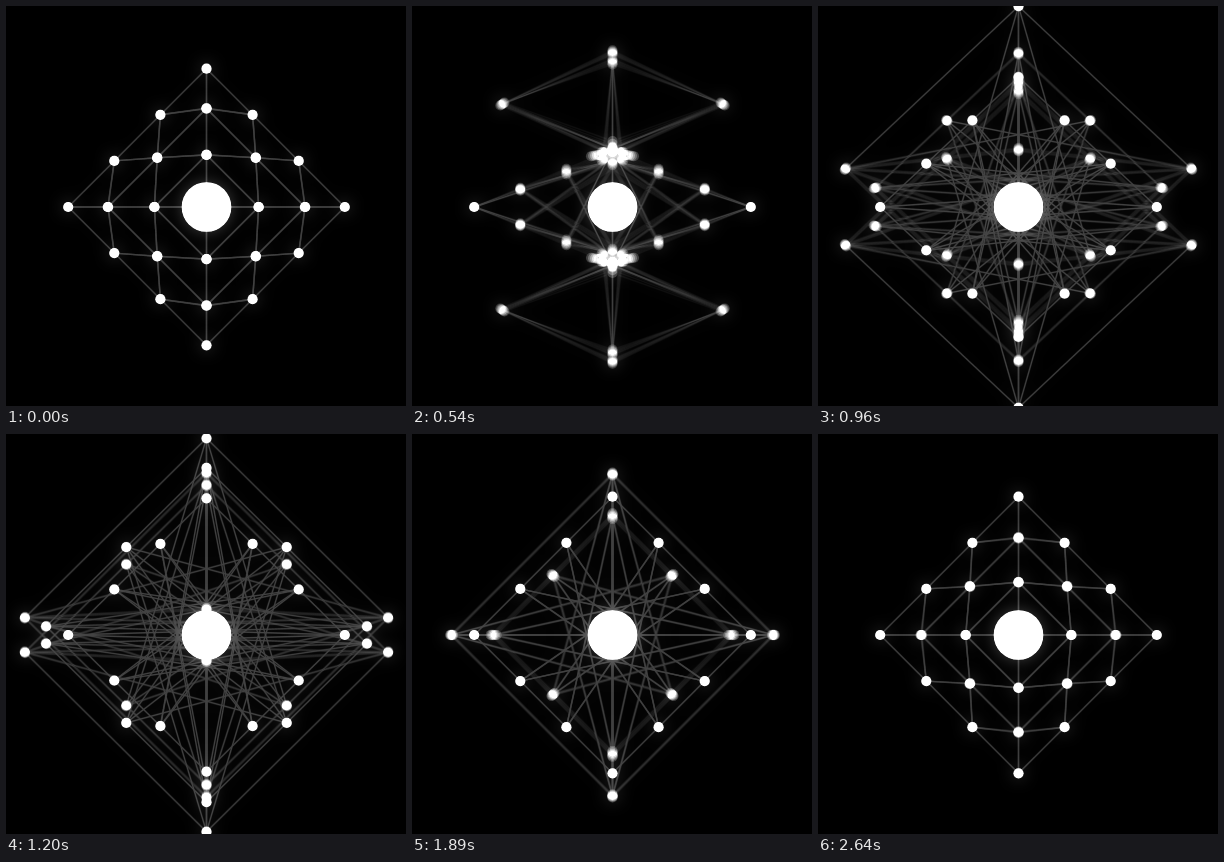
Animation of 400x400 px, one loop 2.67 s. Source, as an HTML page with a canvas:

```html
<!DOCTYPE html>
<html lang="en">
<head>
<meta charset="utf-8">
<title>Turning octahedron lattice</title>
<style>
  html, body { margin: 0; width: 100%; height: 100%; overflow: hidden; background: #000; }
  canvas { display: block; width: 400px; height: 400px; }
</style>
</head>
<body>
<canvas id="stage" width="400" height="400"></canvas>
<script>
const LOOP = 2670, STEP = 30, SAMPLES = 5;
const SIZE = 400, CX = 200.5, CY = 201;
const UNIT = 46.1, DEPTH = 55.8, DOT = 5.1, HUB = 24.8;

const ctx = document.getElementById('stage').getContext('2d');
const layer = document.createElement('canvas');
layer.width = layer.height = SIZE;
const pen = layer.getContext('2d');

// Monotone cubic curve through [x, y] points, flat at both ends.
function curve(pts) {
  const sec = pts.slice(1).map((p, i) => (p[1] - pts[i][1]) / (p[0] - pts[i][0]));
  const slope = pts.map((_, i) => {
    const a = sec[i - 1], b = sec[i];
    return a > 0 && b > 0 ? 2 * a * b / (a + b) : 0;
  });
  return x => {
    let i = 0;
    while (i < pts.length - 2 && x > pts[i + 1][0]) i++;
    const [x0, y0] = pts[i], [x1, y1] = pts[i + 1];
    const h = x1 - x0, s = (x - x0) / h, r = 1 - s;
    return y0 * r * r * (1 + 2 * s) + y1 * s * s * (3 - 2 * s)
      + h * s * r * (slope[i] * r - slope[i + 1] * s);
  };
}

const turn = curve([[0, 0], [.1, .29], [.1966, .626], [.354, .889], [.545, .987], [.72, 1], [1, 1]]);
const fold = curve([[0, 0], [.2, .028], [.292, .076], [.404, .168], [.607, .557], [.8, .84], [.9, .96], [1, 1]]);

// Lattice points on the surface |x| + |y| + |z| = 3.
const nodes = [];
for (let x = -3; x <= 3; x++)
  for (let y = -3; y <= 3; y++)
    for (let z = -3; z <= 3; z++)
      if (Math.abs(x) + Math.abs(y) + Math.abs(z) === 3) nodes.push([x, y, z]);

const edges = [];
nodes.forEach((a, i) => nodes.slice(0, i).forEach((b, j) => {
  const d = a.map((v, k) => Math.abs(v - b[k]));
  if (Math.max(...d) === 1 && d[0] + d[1] + d[2] === 2) edges.push([i, j]);
}));

function project(time) {
  const angle = Math.PI * turn(time / LOOP);
  const cos = Math.cos(angle), sin = Math.sin(angle);
  const near = 183 - 131 * fold(Math.abs(2 * time / LOOP - 1));
  const scale = [UNIT, 101.4 - near, near, 0];
  return nodes.map(([x, y, z]) => {
    const s = scale[Math.abs(z)];
    return [CX + x * s, CY + y * s * cos - z * DEPTH * sin];
  });
}

function disc(x, y, r) {
  pen.beginPath();
  pen.arc(x, y, r, 0, 2 * Math.PI);
  pen.fill();
}

function drawPose(time) {
  const pos = project(time);
  pen.globalCompositeOperation = 'source-over';
  pen.fillStyle = '#000';
  pen.fillRect(0, 0, SIZE, SIZE);
  // Crossing or coinciding lines do not brighten each other.
  pen.globalCompositeOperation = 'lighten';
  pen.strokeStyle = '#383838';
  pen.lineWidth = 1.4;
  for (const [a, b] of edges) {
    pen.beginPath();
    pen.moveTo(...pos[a]);
    pen.lineTo(...pos[b]);
    pen.stroke();
  }
  pen.fillStyle = '#fff';
  for (const [x, y] of pos) disc(x, y, DOT);
  disc(CX, CY, HUB);
}

// Averages several poses across one step for motion blur.
function render(time) {
  ctx.globalCompositeOperation = 'source-over';
  ctx.globalAlpha = 1;
  ctx.fillStyle = '#000';
  ctx.fillRect(0, 0, SIZE, SIZE);
  ctx.globalCompositeOperation = 'lighter';
  ctx.globalAlpha = 1 / SAMPLES;
  for (let i = 0; i < SAMPLES; i++) {
    const back = STEP * (1 - (i + .5) / SAMPLES);
    drawPose((time - back + LOOP) % LOOP);
    ctx.drawImage(layer, 0, 0);
  }
  // Soft bloom
  pen.globalCompositeOperation = 'copy';
  pen.drawImage(ctx.canvas, 0, 0);
  ctx.globalAlpha = .25;
  ctx.filter = 'blur(8px)';
  ctx.drawImage(layer, 0, 0);
  ctx.filter = 'none';
}

const start = performance.now();
let shown = -1;
function tick() {
  const time = Math.floor((performance.now() - start) % LOOP / STEP) * STEP;
  if (time !== shown) render(shown = time);
  requestAnimationFrame(tick);
}
tick();
</script>
</body>
</html>
```
